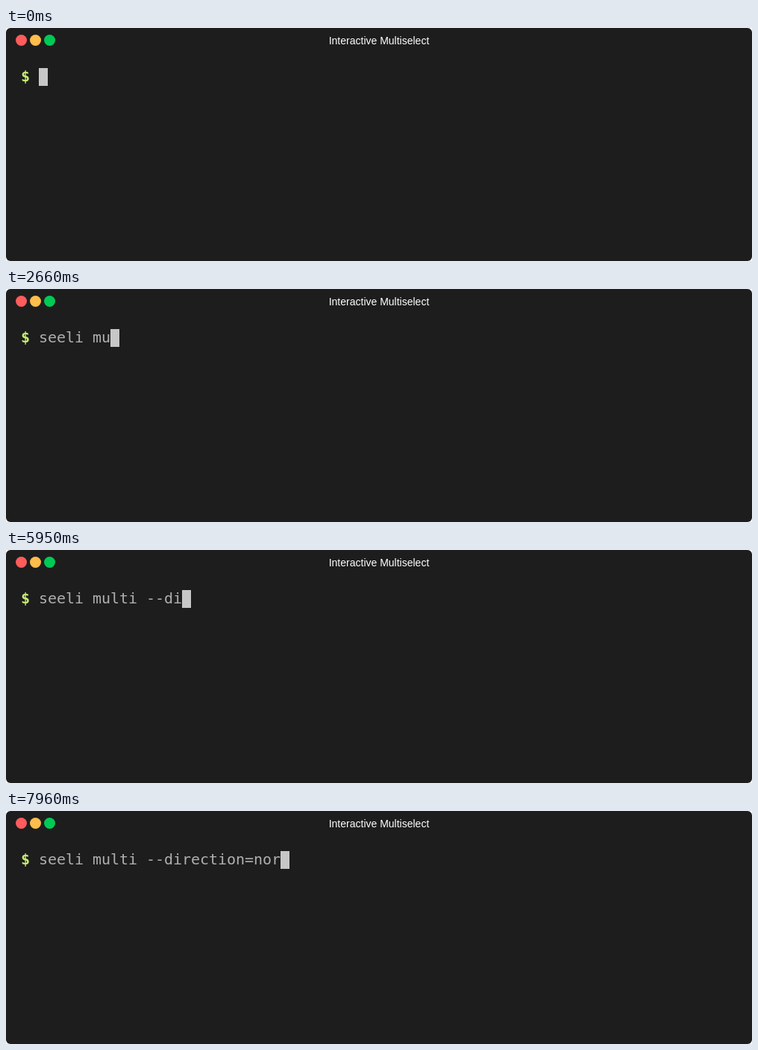
An HTML page for the animation above (8000 ms loop, 1000 by 314 pixels).

```html
<!DOCTYPE html>
<html lang="en">
<head>
<meta charset="utf-8">
<title>Interactive Multiselect</title>
<style>
  html, body { margin: 0; width: 100%; height: 100%; overflow: hidden; background: #fff; }
  svg { display: block; }
  text { white-space: pre; }
  .title { font: 14px "Liberation Sans", Arial, sans-serif; fill: #fff; text-anchor: middle; }
  .term { font: 20px "DejaVu Sans Mono", monospace; fill: #afafaf; }
  .prompt { font-weight: bold; fill: #c8ed71; }
</style>
</head>
<body>
<svg width="1000" height="314" viewBox="0 0 1000 314">
  <rect width="1000" height="314" rx="6" fill="#1d1d1d"/>
  <circle cx="20.5" cy="16.5" r="7.5" fill="#ff5c5c"/>
  <circle cx="39.5" cy="16.5" r="7.5" fill="#ffbd4c"/>
  <circle cx="58.5" cy="16.5" r="7.5" fill="#00ca56"/>
  <text class="title" x="500" y="22">Interactive Multiselect</text>
  <text class="term prompt" x="20" y="72">$</text>
  <text class="term" id="typed" y="72"></text>
  <rect id="cursor" x="44" y="54" width="12" height="24" fill="#c7c7c7"/>
</svg>
<script>
  const LOOP = 8000, LEFT = 44, CELL = 12;
  // Bursts of even typing; times in ms
  const BURSTS = [
    { text: "see", at: 500, step: 160 },
    { text: "li", at: 1070, step: 180 },
    { text: " m", at: 1940, step: 450 },
    { text: "ulti", at: 2660, step: 140 },
    { text: " ", at: 3860, step: 0 },
    { text: "--", at: 5130, step: 230 },
    { text: "dire", at: 5770, step: 120 },
    { text: "ct", at: 6360, step: 150 },
    { text: "ion", at: 6860, step: 90 },
    { text: "=n", at: 7370, step: 280 },
    { text: "or", at: 7790, step: 170 }
  ];
  const command = BURSTS.map(burst => burst.text).join("");
  const typed = document.getElementById("typed");
  const cursor = document.getElementById("cursor");
  const column = i => LEFT + i * CELL;

  typed.setAttribute("x", [...command].map((_, i) => column(i)).join(" "));

  function typedBy(time) {
    return BURSTS.map(({ text, at, step }) =>
      [...text].filter((_, i) => at + i * step <= time).join("")
    ).join("");
  }

  function draw(time) {
    const text = typedBy(time);
    typed.textContent = text;
    cursor.setAttribute("x", column(text.length));
  }

  const start = performance.now();
  function tick() {
    draw((performance.now() - start) % LOOP);
    requestAnimationFrame(tick);
  }
  draw(0);
  requestAnimationFrame(tick);
</script>
</body>
</html>
```
